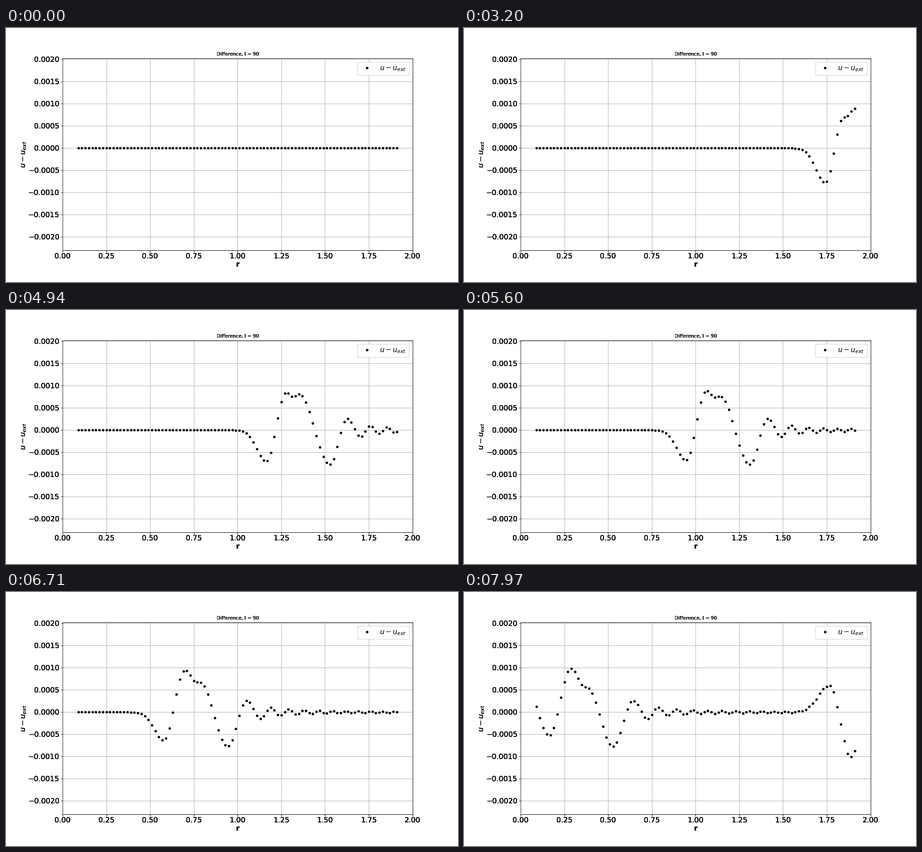
Write a matplotlib script that moves like this. It is 998x561 px and loops after 8 s.

```python
import matplotlib.pyplot as plt
import numpy as np
from matplotlib.animation import FuncAnimation

W, H, DPI = 998, 561, 72
INTERVAL, FRAMES = 20, 400
BOX = (125 / W, 0.125, 772.6 / W, 0.755)
XLIM, YLIM = (0, 2), (-0.0023, 0.00202)
DOT = dict(ls="none", marker=".", ms=9, mew=1, color="black")

STEP_MS, SPEED = 30, 0.01   # one solver step and the distance covered in it
REF_MS, FIRST_STEP, MID_STEP = 3200, -32, 80

r = 0.09 + 0.02 * np.arange(92)

# Turning points of the pulse in its moving frame, heights in 1e-5:
# position, drift per step, height, growth per step, bend.
TURNS = np.array([
    (1.745, 0.00005, -67.5, 0.125, 0),
    (1.862, 0.0002, 89.5, 0.18, -0.0009),
    (1.912, 0.0006, 73.5, -0.10, -0.0015),
    (1.940, 0.0004, 76.5, -0.22, -0.0008),
    (2.110, 0.0001, -77, 0, 0),
    (2.213, 0.00025, 26, 0, 0),
])


def wave(x, xs, ys, width):
    """Gaussian rise to the first turning point, then cosine easing between them."""
    i = np.clip(np.searchsorted(xs, x) - 1, 0, len(xs) - 2)
    f = np.clip((x - xs[i]) / (xs[i + 1] - xs[i]), 0, 1)
    eased = ys[i] + (ys[i + 1] - ys[i]) * (1 - np.cos(np.pi * f)) / 2
    front = ys[0] * np.exp(-((xs[0] - x) / width) ** 2)
    return np.where(x < xs[0], front, eased)


def tail(d, age):
    """Dispersive ripples whose wavelength shrinks behind the pulse."""
    stretch = 0.967 + 0.0009 * age
    k = (np.maximum(d, 0) / stretch / 0.14) ** 1.282
    return 17 / (k + 0.65) * np.cos(2 * np.pi * k)


def pulse(x, age):
    pos, drift, height, growth, bend = TURNS.T
    xs = pos + drift * age
    ys = height + growth * age + bend * age ** 2
    return np.where(x < xs[-1], wave(x, xs, ys, 0.0756), tail(x - xs[-1], age))


def second_pulse(x):
    return wave(x, np.array([3.355, 3.478, 3.6]), np.array([60, -101, 60]), 0.09)


def difference(n):
    if n < FIRST_STEP:
        return np.zeros_like(r)
    age = n - MID_STEP
    x = r + SPEED * n
    echo = pulse(0.2 - r + SPEED * n, age)   # reflection at the inner wall
    return 1e-5 * (pulse(x, age) - echo + second_pulse(x))


def add_chart(fig):
    ax = fig.add_axes(BOX, xlim=XLIM, ylim=YLIM, facecolor="none")
    ax.set_xticks(np.arange(9) * 0.25)
    ax.set_yticks(np.arange(-4, 5) * 0.0005)
    ax.tick_params(labelsize=16)
    ax.tick_params(axis="x", pad=2.8)
    ax.set_axisbelow(True)
    ax.grid(color="#b0b0b0", lw=0.8)
    ax.set_title("Difference, l = 90", fontsize=10.5)
    ax.set_xlabel("r", fontsize=16, fontweight="bold", labelpad=3)
    ax.set_ylabel(r"$u-u_{ext}$", fontsize=16, labelpad=1)
    ax.plot([], [], label=r"$u-u_{ext}$", **DOT)
    ax.legend(loc="upper right", fontsize=15.5)


fig = plt.figure(figsize=(W / DPI, H / DPI), dpi=DPI, facecolor="white")

# The chart is static: overdraw it to darken lines and text, render it once.
for _ in range(5):
    add_chart(fig)
fig.canvas.draw()
backdrop = np.array(fig.canvas.buffer_rgba())
fig.clear()
fig.figimage(backdrop, origin="upper", zorder=-1)

ax = fig.add_axes(BOX, xlim=XLIM, ylim=YLIM)
ax.axis("off")
dots, = ax.plot(r, np.zeros_like(r), **DOT)


def update(frame):
    t = (frame + 0.5) * INTERVAL
    dots.set_ydata(difference((t - REF_MS) // STEP_MS))
    return dots,


anim = FuncAnimation(fig, update, frames=FRAMES, interval=INTERVAL,
                     repeat=True, repeat_delay=0)
plt.show()
```
